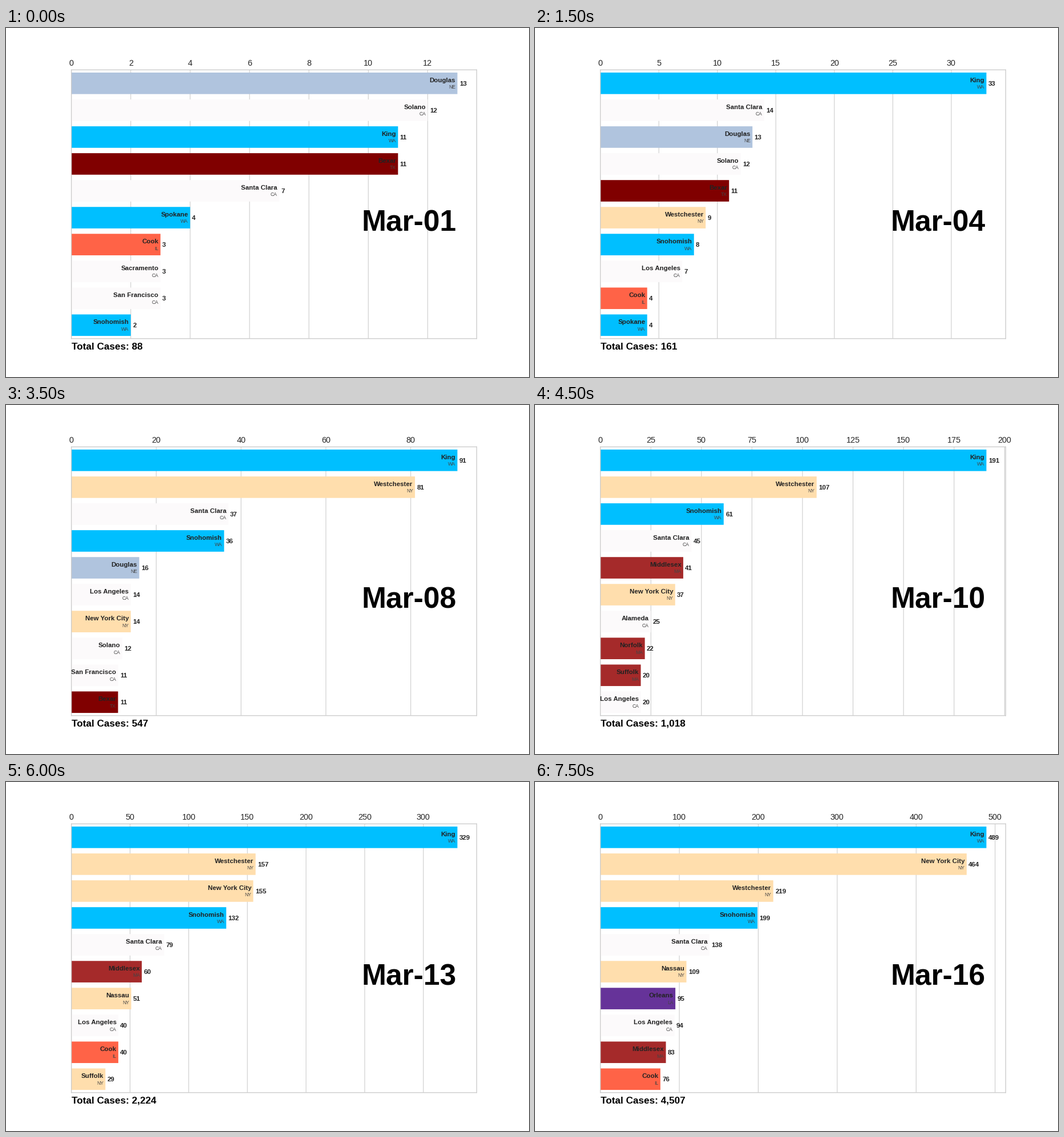
A matplotlib script for the animation above (8 s loop, 917 px wide and 611 px high).

```python
import matplotlib.pyplot as plt
from matplotlib.animation import FuncAnimation
from matplotlib.ticker import MaxNLocator

W, H, DPI = 917, 611, 64
DAYS = 16
ROW = 0.77 * H / 10  # height of one bar slot in pixels
STATE_COLORS = {
    "NE": "lightsteelblue", "CA": "#fcfafb", "WA": "deepskyblue",
    "TX": "maroon", "IL": "tomato", "NY": "navajowhite",
    "MA": "brown", "LA": "rebeccapurple",
}
TOTALS = [88, 104, 125, 161, 228, 311, 428, 547,
          748, 1018, 1263, 1668, 2224, 2898, 3600, 4507]

plt.rcParams["font.family"] = "Liberation Sans"
counties = []


def county(name, state, start, *cases):
    """Daily counts from a start day; the last one holds."""
    counties.append((name, state, start, cases))


# The order settles ties.
county("King", "WA", 1, 11, 14, 21, 33, 51, 59, 74, 91,
       117, 191, 235, 270, 329, 389, 420, 489)
county("Suffolk", "MA", 10, 20)
county("Los Angeles", "CA", 4, 7, 11, 13, 14, 14, 19, 20, 29, 32, 40, 53, 69, 94)
county("Cook", "IL", 1, 3, 4, 4, 4, 5, 6, 7, 7, 9, 12, 20, 28, 40, 46, 61, 76)
county("Harris", "TX", 6, 5)
county("Sacramento", "CA", 1, 3)
county("San Francisco", "CA", 1, 3, 3, 3, 3, 5, 5, 11, 11, 16)
county("Bexar", "TX", 1, 11)
county("New York City", "NY", 7, 12, 14, 20, 37, 53, 95, 155, 269, 330, 464)
county("Solano", "CA", 1, 12)
county("Douglas", "NE", 1, 13, 13, 13, 13, 13, 14, 15, 16)
county("Santa Clara", "CA", 1, 7, 9, 11, 14, 20, 24, 32, 37,
       43, 45, 48, 66, 79, 91, 114, 138)
county("Snohomish", "WA", 1, 2, 4, 6, 8, 18, 18, 27, 36,
       37, 61, 69, 107, 132, 154, 175, 199)
county("Spokane", "WA", 1, 4)
county("Westchester", "NY", 4, 9, 17, 33, 70, 81, 98, 107, 121, 148, 157, 178, 196, 219)
county("Middlesex", "MA", 9, 15, 41, 44, 49, 60, 65, 75, 83)
county("Alameda", "CA", 10, 25)
county("Norfolk", "MA", 10, 22, 24)
county("Nassau", "NY", 9, 17, 19, 28, 41, 51, 79, 98, 109)
county("Suffolk", "NY", 13, 29)
county("Orleans", "LA", 14, 55, 75, 95)


def top_ten(day):
    rows = [(name, state, cases[min(day - start, len(cases) - 1)])
            for name, state, start, cases in counties if day >= start]
    return sorted(rows, key=lambda row: -row[2])[:10]


fig = plt.figure(figsize=(W / DPI, H / DPI), dpi=DPI, facecolor="white")
ax = fig.add_axes([0.125, 0.11, 0.775, 0.77])
locator = MaxNLocator(9, steps=[1, 2, 2.5, 5, 10])


def pt(px):
    return px * 72 / DPI


def label(x, y, text, px, color="#222222", weight="bold", **kw):
    ax.text(x, y, text, size=pt(px), color=color, weight=weight, va="baseline", **kw)


def draw(frame):
    day = frame + 1
    rows = top_ten(day)
    peak = rows[0][2]
    limit, gap = peak * 1.05, peak / 200

    ax.clear()
    ax.set(xlim=(0, limit), ylim=(9.5, -0.5), xticks=[], yticks=[])
    for spine in ax.spines.values():
        spine.set(color="#cccccc", linewidth=pt(1.35), snap=False)

    for tick in locator.tick_values(0, limit):
        if 0 <= tick <= limit:
            ax.axvline(tick, color="#cccccc", lw=pt(1.1), zorder=0, snap=False)
            label(tick, 1 + 7.6 / (ROW * 10), f"{tick:g}", 14.4, "#262626", "normal",
                  ha="center", transform=ax.get_xaxis_transform())

    for i, (name, state, value) in enumerate(rows):
        ax.barh(i, value, 0.8, color=STATE_COLORS[state], lw=0, snap=False)
        label(value - gap, i - 1.8 / ROW, name, 11.45, ha="right")
        label(value - gap, i + 0.2, state, 8.5, "#444444", "normal", ha="right")
        label(value + gap, i + 3.8 / ROW, f"{value}", 11.45, ha="left")

    label(0.95, 0.4, f"Mar-{day:02d}", 51.5, "black", ha="right", transform=ax.transAxes)
    label(0, -19.2 / (ROW * 10), f"Total Cases: {TOTALS[frame]:,}", 17.1, "black",
          ha="left", transform=ax.transAxes)
    return []


anim = FuncAnimation(fig, draw, frames=DAYS, init_func=lambda: [], interval=500,
                     repeat=True, repeat_delay=0, blit=False)
plt.show()
```
